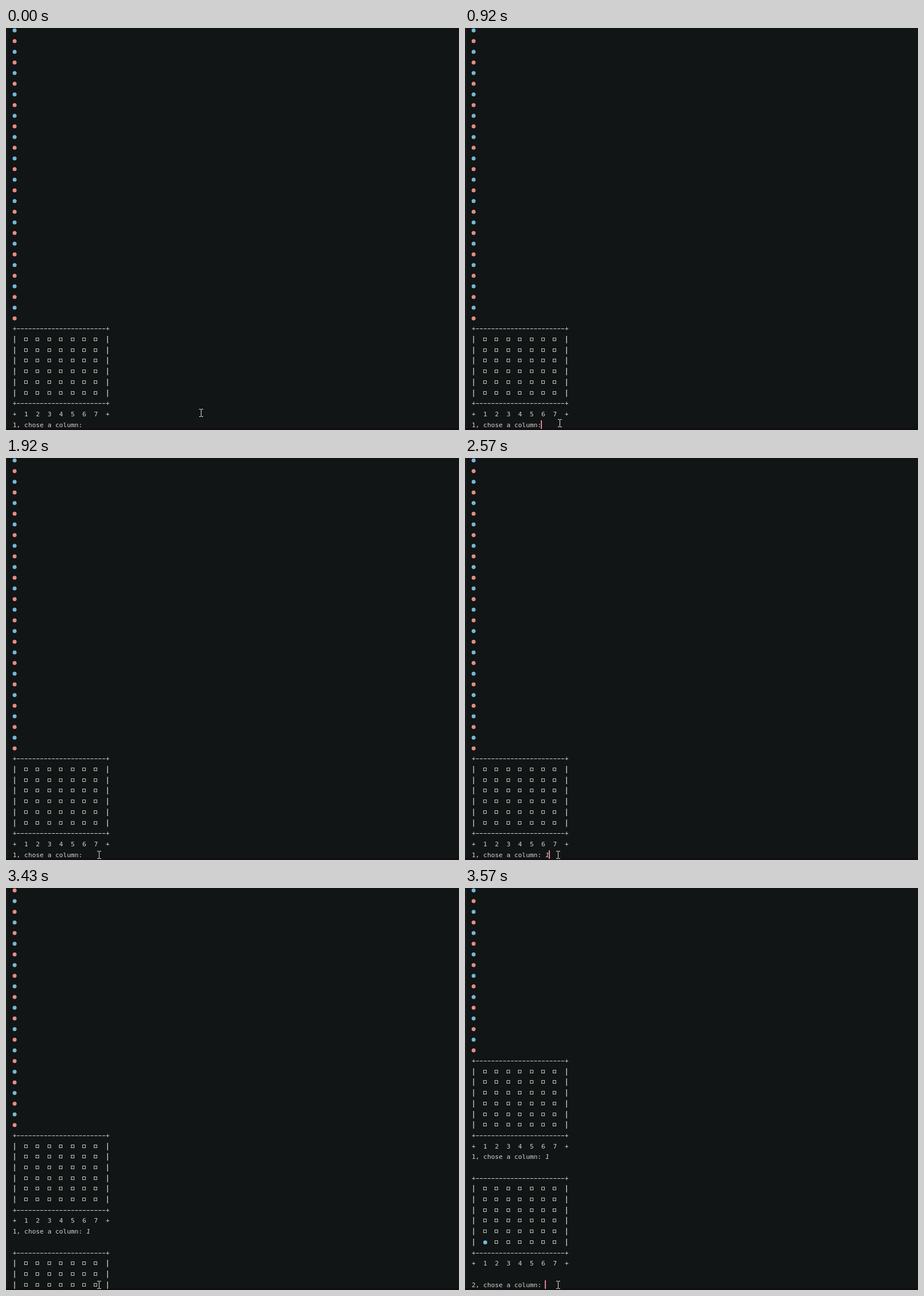
An HTML page with a canvas for the animation above (4450 ms loop, 795x705 px).

```html
<!DOCTYPE html>
<html lang="en">
<head>
<meta charset="utf-8">
<title>Terminal board game</title>
<style>
  html, body { margin: 0; height: 100%; overflow: hidden; background: #111515; }
  canvas { display: block; }
</style>
</head>
<body>
<canvas id="stage" width="795" height="705"></canvas>
<script>
const ctx = document.getElementById('stage').getContext('2d');
const LEFT = 11.7, CELL = 6.8, FIRST = 4.3, ROW = 18.7;
const TEXT = '#d2d4d2', SQUARE = '#c8c8be', BLUE = '#74b8d8', RED = '#e58d82';
const CARET = '#e8809a', POINTER = '#e8e8e8';

// Moments of the loop in ms
const LOOP = 4450, FOCUS = 530, SNAP = 1020, TYPE = 2570;
const ENTER = 3240, PRINT = 3430, PRINTED = 3510, PROMPT = 3570;

let scrolled = 0;
const cellX = col => LEFT + col * CELL;
const centerX = col => cellX(col + 0.5);
const centerY = row => FIRST + (row - scrolled) * ROW;
const snapY = row => Math.floor(centerY(row));
const between = (t, from, to) => t >= from && t < to;
const mix = (a, b, u) => a + (b - a) * u;
const progress = (t, from, to) => Math.min(1, Math.max(0, (t - from) / (to - from)));

function rect(x, y, w, h, color) {
  ctx.fillStyle = color;
  ctx.fillRect(x, y, w, h);
}

function text(str, row, col = 0, style = '') {
  ctx.font = `${style} 11.3px "DejaVu Sans Mono", monospace`;
  ctx.fillStyle = TEXT;
  ctx.fillText(str, cellX(col), snapY(row) + 4);
}

function dot(row, col, color) {
  ctx.fillStyle = color;
  ctx.beginPath();
  ctx.arc(centerX(col), centerY(row), 3.5, 0, Math.PI * 2);
  ctx.fill();
}

function border(row) {
  text('+', row);
  text('+', row, 24);
  for (let col = 1; col < 24; col++) rect(centerX(col) - 2.6, snapY(row), 5.2, 1, TEXT);
}

function board(top, hasDisc) {
  border(top);
  for (let row = top + 1; row <= top + 6; row++) {
    for (const col of [0, 24]) rect(centerX(col) - 0.65, snapY(row) - 6, 1.3, 13, TEXT);
    for (let col = 3; col <= 21; col += 3) {
      if (hasDisc && row === top + 6 && col === 3) dot(row, col, BLUE);
      else {
        ctx.strokeStyle = SQUARE;
        ctx.strokeRect(Math.floor(centerX(col)) - 2.5, snapY(row) - 2.5, 5, 5);
      }
    }
  }
  border(top + 7);
  text('+  1  2  3  4  5  6  7  +', top + 8);
}

function drawPointer(t) {
  const glide = 1 - (1 - progress(t, 240, 730)) ** 4;
  const settle = progress(t, 780, 1110);
  const x = Math.round(mix(342, 169, glide) - 6 * settle);
  const y = Math.round(mix(675, 697, glide) - settle - 4 * Math.sin(Math.PI * settle));
  rect(x, y - 6, 1, 12, POINTER);
  for (const edge of [y - 7, y + 6]) {
    rect(x - 3, edge, 3, 1, POINTER);
    rect(x + 1, edge, 3, 1, POINTER);
  }
}

function drawCaret(t) {
  const hidden = t < FOCUS || between(t, 1920, 2440) || between(t, PRINT, PROMPT);
  if (hidden) return;
  let col = t < SNAP ? 18 : 19;
  if (between(t, TYPE, ENTER)) col = 20;
  if (between(t, ENTER, PRINT)) col = 0;
  const x = Math.max(Math.ceil(LEFT), Math.floor(cellX(col) - 0.2));
  rect(x, 688, 2, 15, CARET);
}

function scrollRows(t) {
  if (t < ENTER) return 0;
  if (t < PRINT) return 1;
  if (t < PRINTED) return 5;
  return t < PROMPT ? 10.4 : 12;
}

function draw(t) {
  scrolled = scrollRows(t);
  rect(0, 0, 795, 705, '#111515');
  rect(0, 0, 3, 705, '#161a1a');
  rect(0, 702, 795, 3, '#100e10');

  for (let row = 0; row < 28; row++) dot(row, 0, row % 2 ? RED : BLUE);
  board(28, false);
  text('1, chose a column:', 37);
  if (t >= TYPE) text('1', 37, 19, 'italic');
  if (t >= PRINT) board(39, true);
  if (t >= PROMPT) text('2, chose a column:', 49);

  drawCaret(t);
  drawPointer(t);
}

const start = performance.now();
function tick() {
  draw((performance.now() - start) % LOOP);
  requestAnimationFrame(tick);
}
tick();
</script>
</body>
</html>
```
